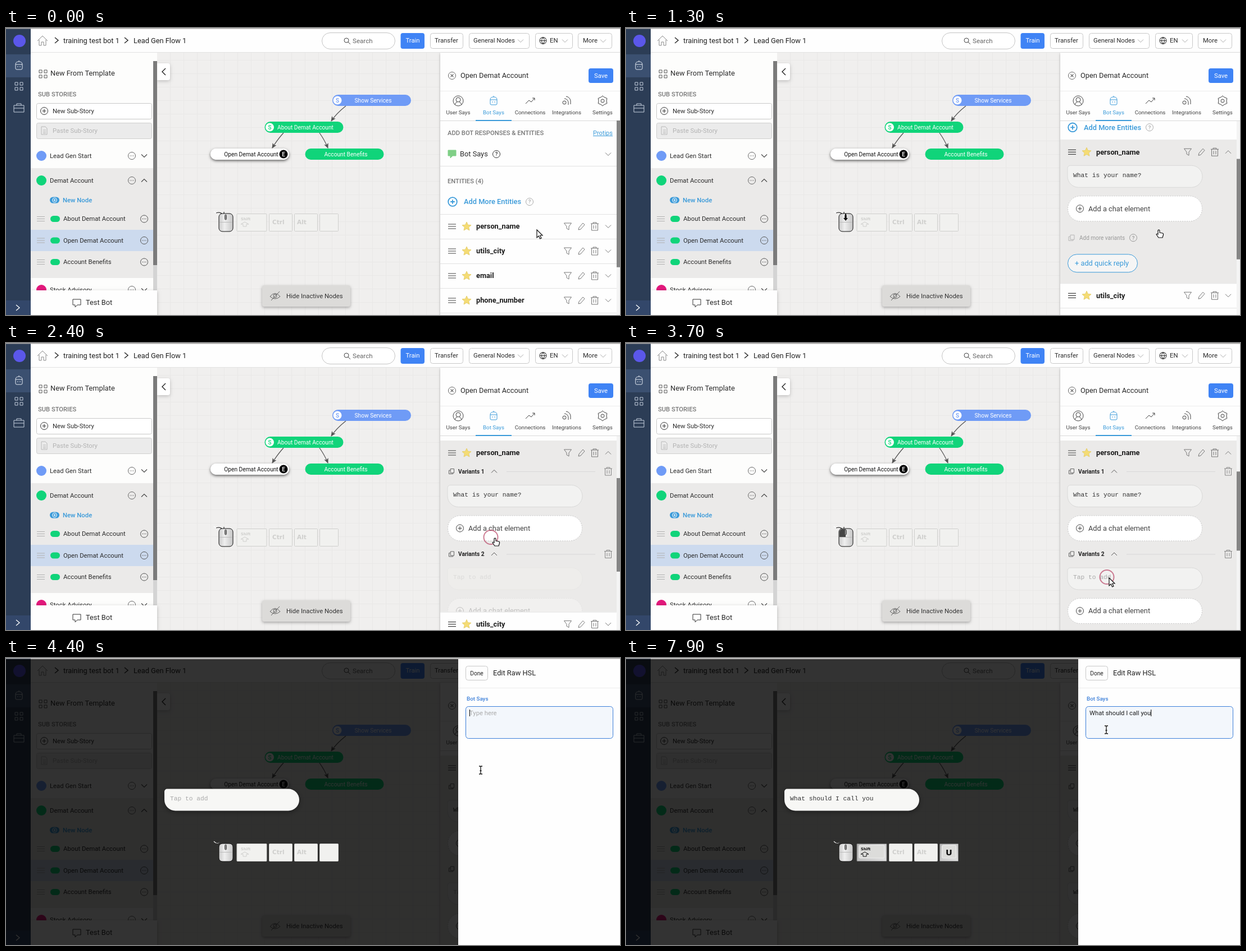
An HTML page with a canvas that plays this animation: 1093 px wide and 512 px high, repeating every 8000 ms.

```html
<!DOCTYPE html>
<html lang="en">
<head>
<meta charset="utf-8">
<title>Bot builder</title>
<style>
html, body { margin: 0; width: 100%; height: 100%; overflow: hidden; }
canvas { display: block; }
</style>
</head>
<body>
<canvas id="stage" width="1093" height="512"></canvas>
<script>
const g = document.getElementById('stage').getContext('2d');
const BLUE = '#3a9ad9', GREEN = '#10d47a', NODE = '#6f9bf6', SOFT = '#ebeae9', INK = '#2b2b2b', GREY = '#777';
const SANS = 'Roboto, sans-serif', MONO = '"Liberation Mono", monospace', KEY = '"DejaVu Sans", sans-serif';
const LOOP = 8000, MESSAGE = 'What should I call you';

// [time, characters typed]
const TYPING = [[5000, 1], [5300, 2], [5400, 3], [5500, 4], [5600, 5], [5800, 6], [5900, 7], [6000, 8],
  [6200, 9], [6300, 10], [6500, 12], [6700, 14], [6800, 15], [6900, 16], [7000, 17], [7200, 18],
  [7400, 19], [7600, 20], [7800, 21], [7900, 22]];
// [time, x, y]
const TRACK = [[0, 945, 360], [1700, 945, 360], [2200, 867, 348], [2800, 867, 348], [3500, 860, 419],
  [3900, 860, 419], [4400, 845, 200], [4500, 853, 130], [4600, 855, 128]];
const CLICKS = [400, 2200, 3700];

const ICON = {
  home: 'M-9 1L0-8L9 1M-6-1V9H-2V3H2V9H6V-1',
  right: 'M-3-5L3 0L-3 5', left: 'M3-6L-3 0L3 6', down: 'M-5-2.5L0 2.5L5-2.5', up: 'M-5 2.5L0-2.5L5 2.5',
  grid: 'M-7-7h5v5h-5zM2-7h5v5h-5zM-7 2h5v5h-5zM2 2h5v5h-5z',
  bot: 'M-6-2Q-6-7 0-7T6-2V5Q6 7 4 7H-4Q-6 7-6 5ZM-6-2H6M-2 1v2M2 1v2M0-7v-2',
  bag: 'M-9-4H9V8H-9ZM-4-4V-7H4V-4M-9 1H9',
  find: 'M3 0A4 4 0 1 1-5 0A4 4 0 1 1 3 0M2 3L6 7',
  ring: 'M6.5 0A6.5 6.5 0 1 1-6.5 0A6.5 6.5 0 1 1 6.5 0',
  plus: 'M-3.5 0H3.5M0-3.5V3.5', cross: 'M-2.5-2.5L2.5 2.5M2.5-2.5L-2.5 2.5',
  dots: 'M-3.5 0h1.4M-.7 0h1.4M2.1 0h1.4',
  globe: 'M7 0A7 7 0 1 1-7 0A7 7 0 1 1 7 0M-7 0H7M0-7Q-6 0 0 7Q6 0 0-7',
  doc: 'M-5-7H2L5-4V7H-5ZM-2-1H3M-2 2H3M-2 4.5H3',
  chat: 'M-7-6H7V4H1L-3 8V4H-7Z',
  bars: 'M-7-4H7M-7 0H7M-7 4H7',
  star: 'M0-8L2.3-2.8L8-2.3L3.7 1.5L5 7L0 4.1L-5 7L-3.7 1.5L-8-2.3L-2.3-2.8Z',
  filter: 'M-6.5-6H6.5L2 0V6L-2 3.5V0Z',
  pencil: 'M-5 6L-4 2L3-6L6-3L-1 5Z',
  trash: 'M-7-5H7M-3-5V-7H3V-5M-5.5-5V7H5.5V-5M-2-2V4M2-2V4',
  copy: 'M-2-5H5V3H-2ZM-2-2H-5V5H3V3',
  eye: 'M-9 1Q0-10 9 1Q0 9-9 1M3 0A3 3 0 1 1-3 0A3 3 0 1 1 3 0M-7 8L8-8',
  user: 'M9 0A9 9 0 1 1-9 0A9 9 0 1 1 9 0M4-2A4 4 0 1 1-4-2A4 4 0 1 1 4-2M-6 7Q-5 3-2 2M6 7Q5 3 2 2',
  graph: 'M-8 5L-2-1L2 2L8-5M4-5H8V-1',
  waves: 'M-1 3A3 3 0 1 1-7 3A3 3 0 1 1-1 3M-4-4A7 7 0 0 1 3 3V7M-1-8A9 9 0 0 1 7 0V6',
  gear: 'M0-9L3-6.5L7.8-4.5L7 0L7.8 4.5L3 6.5L0 9L-3 6.5L-7.8 4.5L-7 0L-7.8-4.5L-3-6.5ZM3 0A3 3 0 1 1-3 0A3 3 0 1 1 3 0',
  shift: 'M0-4L7 0H3V4H-3V0H-7Z',
  arrow: 'M0 0V14L3.3 11L5.6 16L8 15L5.7 10H10Z',
  hand: 'M2 1Q4-1 5 1.5V5L10 6Q12 6.5 11.5 9L10 14H3L-1 8Q0 6.5 2 8Z',
  beam: 'M-3-7H-1L0-6L1-7H3M0-6V6M-3 7H-1L0 6L1 7H3M-1.5 1H1.5'
};

const clamp = v => Math.max(0, Math.min(1, v));
const span = (t, a, b) => clamp((t - a) / (b - a));
const smooth = p => p * p * (3 - 2 * p);
const easeOut = p => 1 - (1 - p) ** 2;

function text(s, x, y, size = 11.3, color = INK, weight = 400, align = 'left', family = SANS) {
  g.font = `${weight} ${size}px ${family}`;
  g.textAlign = align;
  g.fillStyle = color;
  g.fillText(s, x, y + size * 0.35);
}
function rect(x, y, w, h, color) {
  g.fillStyle = color;
  g.fillRect(x, y, w, h);
}
function box(x, y, w, h, r, fill, stroke, dash = []) {
  g.beginPath();
  g.roundRect(x, y, w, h, r);
  if (fill) { g.fillStyle = fill; g.fill(); }
  if (stroke) {
    g.setLineDash(dash);
    g.lineWidth = 1;
    g.strokeStyle = stroke;
    g.stroke();
    g.setLineDash([]);
  }
}
function disc(x, y, r, color) {
  box(x - r, y - r, 2 * r, 2 * r, r, color);
}
function icon(name, x, y, color = '#555', width = 1, fill, scale = 1) {
  const path = new Path2D(ICON[name]);
  g.save();
  g.translate(x, y);
  g.scale(scale, scale);
  if (fill) { g.fillStyle = fill; g.fill(path); }
  g.lineWidth = width / scale;
  g.strokeStyle = color;
  g.stroke(path);
  g.restore();
}
function ringed(name, x, y, color, width = 1, scale = 1) {
  icon('ring', x, y, color, width, null, scale);
  icon(name, x, y, color, width * 1.1, null, scale);
}
function help(x, y, color) {
  icon('ring', x, y, color);
  text('?', x, y, 9.5, color, 500, 'center');
}
function shadowed(blur, alpha, draw) {
  g.save();
  g.shadowBlur = blur;
  g.shadowOffsetY = 2;
  g.shadowColor = `rgba(0,0,0,${alpha})`;
  draw();
  g.restore();
}

function topBar() {
  rect(44, 0, 1049, 44, '#fefefe');
  rect(44, 43, 1049, 1, '#e2e2e2');
  icon('home', 65, 22, '#888');
  icon('right', 90, 22, INK, 1.5);
  text('training test bot 1', 102, 22.5, 12.8, '#222');
  icon('right', 214, 22, INK, 1.5);
  text('Lead Gen Flow 1', 227, 22.5, 12.8, '#222');
  box(562.5, 8.5, 130, 29, 14.5, '#fff', '#c4c4c4');
  icon('find', 607, 22, '#444');
  text('Search', 617, 22.5, 11.6, '#666');
  box(702.5, 9, 42.5, 28, 4, '#3f83f5');
  text('Train', 724, 22.5, 11.3, '#fff', 400, 'center');
  for (const [x, w] of [[755, 58], [824, 107], [942, 66], [1018, 60]]) box(x + 0.5, 9.5, w, 27, 4, '#fff', '#c8c8c8');
  text('Transfer', 763, 22.5);
  text('General Nodes', 832, 22.5);
  icon('globe', 956, 22.5, '#333', 1, null, 0.85);
  text('EN', 968, 22.5);
  text('More', 1027, 22.5);
  for (const x of [916, 995, 1063]) icon('down', x, 23, '#aaa');
}

function navRail() {
  rect(0, 0, 44, 512, '#2c3d56');
  rect(0, 47, 44, 41, '#3b5070');
  rect(0, 486, 44, 26, '#33476a');
  disc(24, 23, 11, '#5b57ea');
  icon('bot', 23, 67, '#e3e9f2');
  icon('grid', 23, 104, '#c5cfdd');
  icon('bag', 23, 142, '#c5cfdd');
  icon('right', 21, 499, '#fff', 1.3);
}

function story(name, y, color, mark) {
  disc(63, y, 9, color);
  text(name, 78, y);
  ringed('dots', 224, y, '#666');
  icon(mark, 246, y, '#444', 1.1);
}

function sidebar() {
  rect(44, 44, 225, 468, '#fdfdfc');
  icon('grid', 66, 82, '#555');
  text('New From Template', 79, 81, 12.8);
  text('SUB STORIES', 57, 118, 11.2, GREY, 500);
  box(54.5, 134.5, 205, 28, 3, '#fff', '#c9c9c9');
  ringed('plus', 68, 148, '#333');
  text('New Sub-Story', 83, 148);
  box(54.5, 169.5, 205, 28, 3, '#ebebeb', '#cfcfcf');
  icon('doc', 68, 183, '#b8b8b8');
  text('Paste Sub-Story', 83, 183, 11.3, '#b3b3b3');
  story('Lead Gen Start', 228, NODE, 'down');
  rect(44, 250, 218, 196, SOFT);
  rect(44, 360, 218, 38, '#ccdaee');
  story('Demat Account', 272, GREEN, 'up');
  box(78, 301.5, 17, 11, 5.5, BLUE);
  ringed('plus', 86.5, 307, '#fff', 1, 0.6);
  text('New Node', 101, 307, 11.3, BLUE, 500);
  ['About Demat Account', 'Open Demat Account', 'Account Benefits'].forEach((name, i) => {
    const y = 340.5 + i * 38.5;
    icon('bars', 62, y, '#b0b0b0');
    box(79, y - 5.5, 17, 11, 5.5, GREEN);
    text(name, 102, y);
    ringed('dots', 246, y, '#555');
  });
  story('Stock Advisory', 467, '#e2187b', 'down');
  rect(262, 59, 7, 409, '#d4d4d4');
  rect(262, 59, 7, 364, '#7b7b7b');
  shadowed(6, 0.25, () => rect(44, 468, 225, 44, '#fefefe'));
  icon('chat', 126, 490, '#333');
  text('Test Bot', 142, 490, 12.8);
}

function node(name, x, y, fill, badge) {
  box(x, y - 10, 140, 20, 10, fill);
  text(name, x + 72.5, y, 10.2, fill === '#fff' ? '#111' : '#fff', 400, 'center');
  if (badge === 'S') {
    disc(x + 9, y, 7.5, '#fff');
    text('S', x + 9, y, 10, fill, 500, 'center');
  } else if (badge) {
    disc(x + 130, y, 7.5, '#000');
    text(badge, x + 130, y, 10, '#fff', 500, 'center');
  }
}
function link(x1, y1, x2, y2, bend) {
  const cx = (x1 + x2) / 2 + bend, cy = (y1 + y2) / 2;
  g.strokeStyle = g.fillStyle = '#555';
  g.lineWidth = 1.3;
  g.beginPath();
  g.moveTo(x1, y1);
  g.quadraticCurveTo(cx, cy, x2, y2);
  g.stroke();
  g.save();
  g.translate(x2, y2);
  g.rotate(Math.atan2(y2 - cy, x2 - cx));
  g.fill(new Path2D('M1 0L-8-4L-6 0L-8 4Z'));
  g.restore();
}

function flow() {
  rect(269, 44, 504, 468, '#f0efee');
  for (let x = 292; x < 773; x += 24) rect(x, 44, 1, 468, '#e9e8e7');
  for (let y = 57; y < 512; y += 24) rect(269, y, 504, 1, '#e9e8e7');
  shadowed(6, 0.2, () => box(269, 63, 23, 30, [0, 4, 4, 0], '#fff'));
  icon('left', 281, 78, '#222', 1.4);
  link(605, 139, 579, 166, -4);
  link(494, 187, 474, 214, -2);
  link(558, 187, 573, 214, 2);
  node('Show Services', 581, 129, NODE, 'S');
  node('About Demat Account', 460.5, 177, GREEN, 'S');
  shadowed(5, 0.6, () => box(364, 215, 140, 20, 10, '#fff'));
  node('Open Demat Account', 364, 225, '#fff', 'E');
  node('Account Benefits', 532.5, 225, GREEN);
  shadowed(5, 0.3, () => box(456, 459, 157, 38, 4, '#dcdbd9'));
  icon('eye', 479, 478, '#555', 0.9);
  text('Hide Inactive Nodes', 499, 478, 11.3, '#333');
}

function bubble(x, y, value, fill, stroke) {
  box(x, y, 240, 39, [5, 20, 20, 20], fill, stroke);
  text(value || 'Tap to add', x + 10, y + 16.5, 11.25, value ? '#333' : '#aaa', 400, 'left', MONO);
}
function chatItems(y, value) {
  bubble(786, y, value, '#f2f2f1', '#d9d9d8');
  box(786.5, y + 54.5, 239, 45, 22, '#fff', '#c5c5c5', [2, 2]);
  ringed('plus', 808, y + 77, '#444');
  text('Add a chat element', 823, y + 77, 12.8, '#444');
}
function variant(n, y, value, alpha) {
  icon('copy', 793, y, '#666', 1, null, 0.9);
  text('Variants ' + n, 805, y, 10.2, '#222', 700);
  icon('up', 869, y, '#555');
  rect(891, y, 158, 1, '#d8d8d8');
  icon('trash', 1072, y, '#888');
  g.globalAlpha = alpha;
  chatItems(y + 24.5, value);
  g.globalAlpha = 1;
}
function entity(name, y, open) {
  icon('bars', 794, y, '#444', 1.2);
  icon('star', 820, y, '#e6cf6e', 1, '#f5dc74');
  text(name, 837, y, 12.8, '#1d1d1d', 700);
  ['filter', 'pencil', 'trash', open ? 'up' : 'down'].forEach((k, i) => icon(k, 1000 + i * 24, y, '#777'));
}

function details(t, typed) {
  const opened = 212 * smooth(span(t, 400, 900));
  const grown = 181 * smooth(span(t, 2295, 2600));
  const scroll = 158 * easeOut(span(t, 1000, 1500));

  shadowed(4, 0.25, () => rect(773, 44, 320, 468, '#fefefe'));
  ringed('cross', 794, 85, '#666');
  text('Open Demat Account', 809, 85, 12.8);
  box(1037, 72, 44, 26, 4, '#3f83f5');
  text('Save', 1059, 85, 11.3, '#fff', 400, 'center');
  rect(773, 112, 320, 1, '#ececec');
  [['User Says', 'user', 805], ['Bot Says', 'bot', 868], ['Connections', 'graph', 933],
   ['Integrations', 'waves', 998], ['Settings', 'gear', 1062]].forEach(([name, mark, x], i) => {
    const color = i === 1 ? BLUE : '#444';
    icon(mark, x, 130, color);
    text(name, x, 151, 9.8, color, 400, 'center');
  });
  rect(773, 165, 320, 1, '#d9d9d9');
  rect(836, 164, 64, 2, BLUE);

  g.save();
  g.beginPath();
  g.rect(773, 166, 320, 346);
  g.clip();
  g.translate(0, -scroll);
  text('ADD BOT RESPONSES & ENTITIES', 786, 187, 11.2, GREY, 500);
  text('Protips', 1045, 187, 11, BLUE);
  rect(1045, 192, 35, 1, BLUE);
  icon('chat', 794, 224, '#7fcf86', 1, '#7fcf86');
  text('Bot Says', 808, 225, 12.8);
  help(873, 225, '#333');
  icon('down', 1072, 225, '#777');
  rect(773, 246, 314, 1, '#e2e2e2');
  text('ENTITIES (4)', 786, 273, 11.2, GREY, 500);
  icon('ring', 795, 310, BLUE, 1.8, null, 1.2);
  icon('plus', 795, 310, BLUE, 1.8, null, 1.1);
  text('Add More Entities', 815, 310, 12.8, BLUE, 500);
  help(932, 310, '#aaa');
  rect(773, 332, 314, 1, '#e2e2e2');

  const y = 354, extra = opened + grown;
  if (extra) {
    rect(773, y - 22, 314, 44 + extra, SOFT);
    g.save();
    g.beginPath();
    g.rect(773, y - 22, 314, 44 + extra);
    g.clip();
    if (grown) {
      variant(1, y + 33, 'What is your name?', 1);
      variant(2, y + 180.5, typed, grown / 181);
    } else {
      chatItems(y + 24, 'What is your name?');
      icon('copy', 793, y + 153, '#b5b5b5');
      text('Add more variants', 807, y + 153, 10, '#999');
      help(903, y + 153, '#999');
      box(786.5, y + 182.5, 124, 32, 16, '#f5f5f5', BLUE);
      text('+ add quick reply', 799, y + 198.5, 12.8, BLUE);
    }
    g.restore();
  }
  entity('person_name', y, extra > 0);
  ['utils_city', 'email', 'phone_number'].forEach((name, i) => {
    const rowY = y + extra + 44 * (i + 1);
    rect(773, rowY - 22, 314, 1, '#e2e2e2');
    entity(name, rowY);
  });
  rect(773, y + extra + 154, 314, 1, '#e2e2e2');
  g.restore();

  const ratio = 347 / (460 + extra);
  rect(1087, 166, 6, 346, '#f4f4f4');
  rect(1087, 165 + scroll * ratio, 6, 347 * ratio, '#858585');
}

function editor(t, typed) {
  const shown = span(t, 3700, 4000), slide = easeOut(span(t, 3700, 4100));
  if (!shown) return;
  rect(0, 2, 1093, 510, `rgba(0,0,0,${0.8 * shown})`);
  g.save();
  g.globalAlpha = shown;
  shadowed(10, 0.4, () => box(282, 233.5, 240, 39, [5, 20, 20, 20], '#f7f7f5'));
  text(typed || 'Tap to add', 292, 250, 11.25, typed ? '#333' : '#aaa', 400, 'left', MONO);
  g.translate(312 * (1 - slide), 0);
  rect(805, 2, 300, 510, '#fefefe');
  box(818.5, 14.5, 39, 25, 4, null, '#c8c8c8');
  text('Done', 838, 27, 10.2, '#222', 400, 'center');
  text('Edit Raw HSL', 867, 27, 12.8, '#222');
  rect(805, 53, 288, 1, '#ececec');
  const focused = t >= 4200, accent = focused ? '#3c7fd9' : '#555';
  text('Bot Says', 820, 73, 9.8, accent, 500);
  box(818.5, 86.5, 262, 57, 5, focused && '#f3f7fc', focused ? accent : '#bbb');
  text(typed || 'Type here', 825, 98, 11.25, typed ? '#1d1d1d' : '#aaa');
  if (focused) rect(825 + (typed ? g.measureText(typed).width : 0), 92, 1, 12, '#000');
  g.restore();
}

function key(x, w, active) {
  if (!active) {
    box(x, 331.5, w, 31, 1, '#f1f1ef', '#cfcfcd');
    return;
  }
  const shade = g.createLinearGradient(x, 331, x + w, 363);
  shade.addColorStop(0, '#b5b5b5');
  shade.addColorStop(1, '#e0e0e0');
  box(x, 331.5, w, 31, 1, shade, '#777');
  box(x + 4, 334, w - 8, 23, 2, '#dcdcda', '#f0f0f0');
}

function keyMonitor(t, typed) {
  const pressed = CLICKS.includes(t), wheel = t >= 1100 && t < 1500;
  g.lineWidth = 1.2;
  g.strokeStyle = '#fff';
  g.stroke(new Path2D('M370 327Q374 332 380 329'));
  g.strokeStyle = '#333';
  g.stroke(new Path2D('M374 330Q381 328 384 331M388 331V328'));
  const body = g.createLinearGradient(379, 0, 404, 0);
  body.addColorStop(0, '#cacaca');
  body.addColorStop(0.4, '#efefef');
  body.addColorStop(1, '#c6c6c6');
  box(379, 331, 25, 32, 6, body, '#111');
  if (pressed) box(380, 332, 11, 14, [5, 0, 0, 0], '#444');
  rect(380, 346, 23, 1, '#bbb');
  box(389.5, 333, 3, 9, 1.5, '#888', '#555');
  if (wheel) {
    g.fillStyle = '#111';
    g.fill(new Path2D('M390 331h2v8h3l-4 5l-4-5h3z'));
  }

  const shifted = t >= 4900, ink = shifted ? '#111' : '#cfcfcd', last = typed.slice(-1);
  key(411, 53, shifted);
  text('Shift', 418, 341, 6.5, ink, 700, 'left', KEY);
  icon('shift', 425, 350, ink);
  key(468.5, 41, false);
  text('Ctrl', 474, 346, 10.5, '#cfcfcd', 700, 'left', KEY);
  key(513.5, 41, false);
  text('Alt', 518, 346, 10.5, '#cfcfcd', 700, 'left', KEY);
  key(558.5, last === ' ' ? 52 : 33, last);
  if (last === ' ') text('Space', 565, 340.5, 8, '#111', 700, 'left', KEY);
  else text(last.toUpperCase(), 575, 347, 14.5, '#111', 700, 'center', KEY);
}

function pointer(t) {
  const next = TRACK.findIndex(p => p[0] > t);
  let [, x, y] = TRACK[TRACK.length - 1];
  if (next > 0) {
    const [t0, x0, y0] = TRACK[next - 1], [t1, x1, y1] = TRACK[next];
    const p = span(t, t0, t1);
    x = x0 + (x1 - x0) * p;
    y = y0 + (y1 - y0) * p;
  }
  if (CLICKS.some(c => t >= c && t < c + 300)) {
    g.strokeStyle = 'rgba(180,55,90,.65)';
    g.lineWidth = 2;
    g.beginPath();
    g.arc(x - 4, y - 1.5, 12.5, 0, 7);
    g.stroke();
  }
  if (t >= 4400) {
    icon('beam', x, y, '#fff', 3);
    icon('beam', x, y, '#111', 1.3);
  } else if (t >= 100 && t < 2900) icon('hand', x, y, '#111', 1.2, '#fff');
  else icon('arrow', x, y, '#111', 1.2, '#fff');
}

function draw(t) {
  const step = TYPING.filter(s => s[0] <= t).pop();
  const typed = MESSAGE.slice(0, step ? step[1] : 0);
  flow();
  sidebar();
  topBar();
  details(t, typed);
  navRail();
  rect(0, 0, 1093, 1.5, '#a9a8a7');
  editor(t, typed);
  keyMonitor(t, typed);
  pointer(t);
}

const start = performance.now();
function tick() {
  draw(Math.floor((performance.now() - start) % LOOP / 100) * 100);
  requestAnimationFrame(tick);
}
tick();
</script>
</body>
</html>
```
